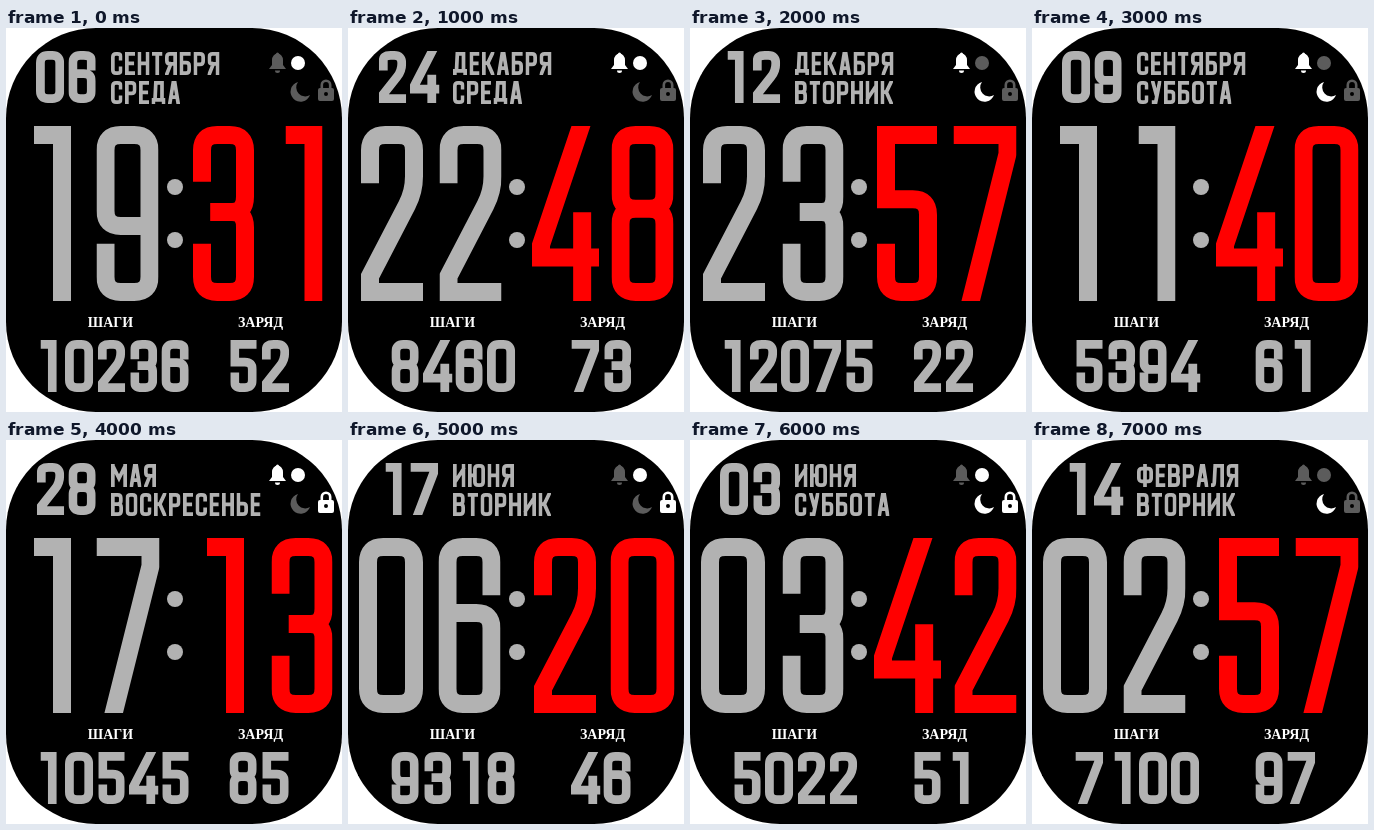
An HTML page that plays this animation: 336x384 px, repeating every 8000 ms.

```html
<!DOCTYPE html>
<html lang="ru">
<head>
<meta charset="utf-8">
<title>Циферблат</title>
<style>
  html, body { margin: 0; width: 100%; height: 100%; overflow: hidden; background: #fff; }
  svg { display: block; }
  #face { width: 336px; height: 384px; }
  .ink { fill: none; stroke-linecap: square; }
  .label { font: bold 14px "Liberation Serif", "Noto Serif", serif; fill: #fff; text-anchor: middle; }
  .screen { visibility: hidden; animation: show 8s step-end infinite; }
  @keyframes show {
    0% { visibility: visible; }
    12.5%, 100% { visibility: hidden; }
  }
</style>
</head>
<body>
<svg id="face" viewBox="0 0 336 384" xmlns="http://www.w3.org/2000/svg">
  <defs>
    <g id="bell">
      <path d="M263 41l3-4v-5a5.5 6.5 0 0 1 11 0v5l3 4z"/>
      <path d="M269 42.5h5a2.5 2.5 0 0 1-5 0z"/>
      <circle cx="271.5" cy="26" r="1.5"/>
    </g>
    <circle id="link" cx="292" cy="35" r="7"/>
    <path id="moon" d="M292 54a10 10 0 1 0 12 13a9 9 0 0 1-12-13z"/>
    <g id="lock">
      <path fill-rule="evenodd" d="M314 60h12a2 2 0 0 1 2 2v9a2 2 0 0 1-2 2h-12a2 2 0 0 1-2-2v-9a2 2 0 0 1 2-2zM318 66a2 2 0 1 0 4 0a2 2 0 1 0-4 0z"/>
      <path d="M314.5 61v-4a5.5 5.5 0 0 1 11 0v4h-2.6v-4a2.9 2.9 0 0 0-5.8 0v4z"/>
    </g>
  </defs>
  <rect width="336" height="384" rx="90"/>
  <g fill="#b2b2b2">
    <circle cx="169" cy="159" r="8"/>
    <circle cx="169" cy="212" r="8"/>
  </g>
  <text class="label" x="104.5" y="299">ШАГИ</text>
  <text class="label" x="254.5" y="299">ЗАРЯД</text>
</svg>
<script>
const NS = 'http://www.w3.org/2000/svg';
const GREY = '#b2b2b2', RED = '#f00', ON = '#fff', OFF = '#5c5c5c';

// Pen strokes in percent of the glyph box; * rounds a corner, z closes, | lifts the pen.
const GLYPHS = {
  0: '0,0* 100,0* 100,100* 0,100* z',
  1: '0,0 100,0 100,100',
  2: '0,25 0,0* 100,0* 100,36* 0,90 0,100 100,100',
  3: '0,24 0,0* 100,0* 100,49* 40,49 | 40,49 100,49* 100,100* 0,100* 0,75',
  4: '84,-8 0,70 0,78 100,78 | 84,55 84,100',
  5: '100,0 0,0 0,41 100,41* 100,100* 0,100* 0,75',
  6: '100,25 100,0* 0,0* 0,100* 100,100* 100,42* 0,42',
  7: '0,0 100,0 100,12 18,106',
  8: '0,0* 100,0* 100,47* 0,47* z | 0,47* 100,47* 100,100* 0,100* z',
  9: '100,58 0,58* 0,0* 100,0* 100,100* 0,100* 0,75',
  А: '0,106 40,0 60,0 100,106 | 20,74 80,74',
  Б: '95,0 0,0 0,100 100,100* 100,45* 0,45',
  В: '0,48 0,0 96,0* 96,48* 0,48 | 0,48 100,48* 100,100* 0,100 0,48',
  Д: '0,100 0,88 100,88 100,100 | 16,88 24,0 84,0 84,88',
  Е: '100,0 0,0 0,100 100,100 | 0,49 85,49',
  И: '0,0 0,100 | 100,0 100,100 | 0,85 100,15',
  К: '0,0 0,100 | 100,-5 45,48 100,105 | 0,48 45,48',
  Л: '0,100 14,100* 25,0 100,0 100,100',
  М: '0,0 0,100 | 100,0 100,100 | 0,0 50,65 100,0',
  Н: '0,0 0,100 | 100,0 100,100 | 0,49 100,49',
  О: '0,0* 100,0* 100,100* 0,100* z',
  Р: '0,100 0,0 100,0* 100,55* 0,55',
  С: '100,25 100,0* 0,0* 0,100* 100,100* 100,75',
  Т: '0,0 100,0 | 50,0 50,100',
  У: '0,-5 50,60 | 100,-5 42,100 12,100',
  Ф: '50,0 50,100 | 0,14* 100,14* 100,80* 0,80* z',
  Ь: '0,0 0,100 100,100* 100,45* 0,45',
  Ю: '0,0 0,100 | 0,49 38,49 | 38,0* 100,0* 100,100* 38,100* z',
  Я: '100,100 100,0 0,0* 0,52* 100,52 | 48,52 0,104'
};

// Left bearing and width of the tall digits.
const DIGITS = [[11, 64], [28, 37], [13, 62], [14, 61], [11, 67], [14, 60], [12, 62], [12, 63], [12, 62], [12, 62]];
const LETTERS = { А: 12, Б: 11.5, В: 12, Д: 14, Е: 10, И: 12.5, К: 12.5, Л: 13, М: 16, Н: 12, О: 12,
  Р: 11.5, С: 11.5, Т: 10.5, У: 10.5, Ф: 16, Ь: 11.5, Ю: 17, Я: 12 };

// icons: bell, link, moon, lock
const SCREENS = [
  ['19', '31', '06', 'СЕНТЯБРЯ', 'СРЕДА', '10236', '52', '0100'],
  ['22', '48', '24', 'ДЕКАБРЯ', 'СРЕДА', '8460', '73', '1100'],
  ['23', '57', '12', 'ДЕКАБРЯ', 'ВТОРНИК', '12075', '22', '1010'],
  ['11', '40', '09', 'СЕНТЯБРЯ', 'СУББОТА', '5394', '61', '1010'],
  ['17', '13', '28', 'МАЯ', 'ВОСКРЕСЕНЬЕ', '10545', '85', '1101'],
  ['06', '20', '17', 'ИЮНЯ', 'ВТОРНИК', '9318', '46', '0101'],
  ['03', '42', '03', 'ИЮНЯ', 'СУББОТА', '5022', '51', '0111'],
  ['02', '57', '14', 'ФЕВРАЛЯ', 'ВТОРНИК', '7100', '97', '0010']
];

function add(parent, tag, attrs) {
  const node = document.createElementNS(NS, tag);
  for (const key in attrs) node.setAttribute(key, attrs[key]);
  return parent.appendChild(node);
}

function toward(a, b, r) {
  const d = Math.hypot(b.x - a.x, b.y - a.y) || 1;
  const k = Math.min(r / d, 0.5);
  return `${a.x + (b.x - a.x) * k} ${a.y + (b.y - a.y) * k}`;
}

function strokePath(spec, w, h, pen) {
  const closed = spec.endsWith('z');
  const pts = spec.replace('z', '').trim().split(' ').map(p => {
    const [x, y] = p.split(',').map(parseFloat);
    return { x: pen / 2 + x / 100 * (w - pen), y: pen / 2 + y / 100 * (h - pen), round: p.endsWith('*') };
  });
  const n = pts.length;
  let d = '';
  pts.forEach((p, i) => {
    const prev = pts[(i + n - 1) % n], next = pts[(i + 1) % n];
    const cmd = i ? 'L' : 'M';
    d += p.round
      ? `${cmd}${toward(p, prev, pen * 0.85)}Q${p.x} ${p.y} ${toward(p, next, pen * 0.85)}`
      : `${cmd}${p.x} ${p.y}`;
  });
  return d + (closed ? 'Z' : '');
}

function glyph(parent, ch, x, y, w, h, pen, color) {
  const box = add(parent, 'svg', { x, y, width: w, height: h });
  const d = GLYPHS[ch].split(' | ').map(s => strokePath(s, w, h, pen)).join('');
  add(box, 'path', { class: 'ink', d, stroke: color, 'stroke-width': pen });
}

function tall(parent, text, x, color) {
  [...text].forEach((ch, i) => {
    const [left, w] = DIGITS[ch];
    glyph(parent, ch, x + i * 78.5 + left, 98, w, 175, 18, color);
  });
}

function small(parent, text, center, y) {
  const step = 32, scale = 0.44, start = center - text.length * step / 2 + 1;
  [...text].forEach((ch, i) => {
    const [left, w] = DIGITS[ch];
    glyph(parent, ch, start + i * step + (left - 11) * scale, y, w * scale, 52, 8.8, GREY);
  });
}

function word(parent, text, y) {
  let x = 105;
  for (const ch of text) {
    glyph(parent, ch, x, y, LETTERS[ch], 23, 3.7, GREY);
    x += LETTERS[ch] + 2.5;
  }
}

SCREENS.forEach(([hour, minute, day, month, weekday, steps, charge, icons], i) => {
  const g = add(document.getElementById('face'), 'g', {
    class: 'screen', role: 'img',
    'aria-label': `${hour}:${minute}, ${day} ${month}, ${weekday}`,
    style: `animation-delay:${i ? i - 8 : 0}s`
  });
  tall(g, hour, 0, GREY);
  tall(g, minute, 173, RED);
  small(g, day, 61, 23);
  word(g, month, 24);
  word(g, weekday, 53);
  small(g, steps, 106, 312);
  small(g, charge, 254, 312);
  ['bell', 'link', 'moon', 'lock'].forEach((id, k) =>
    add(g, 'use', { href: '#' + id, fill: icons[k] === '1' ? ON : OFF }));
});
</script>
</body>
</html>
```
